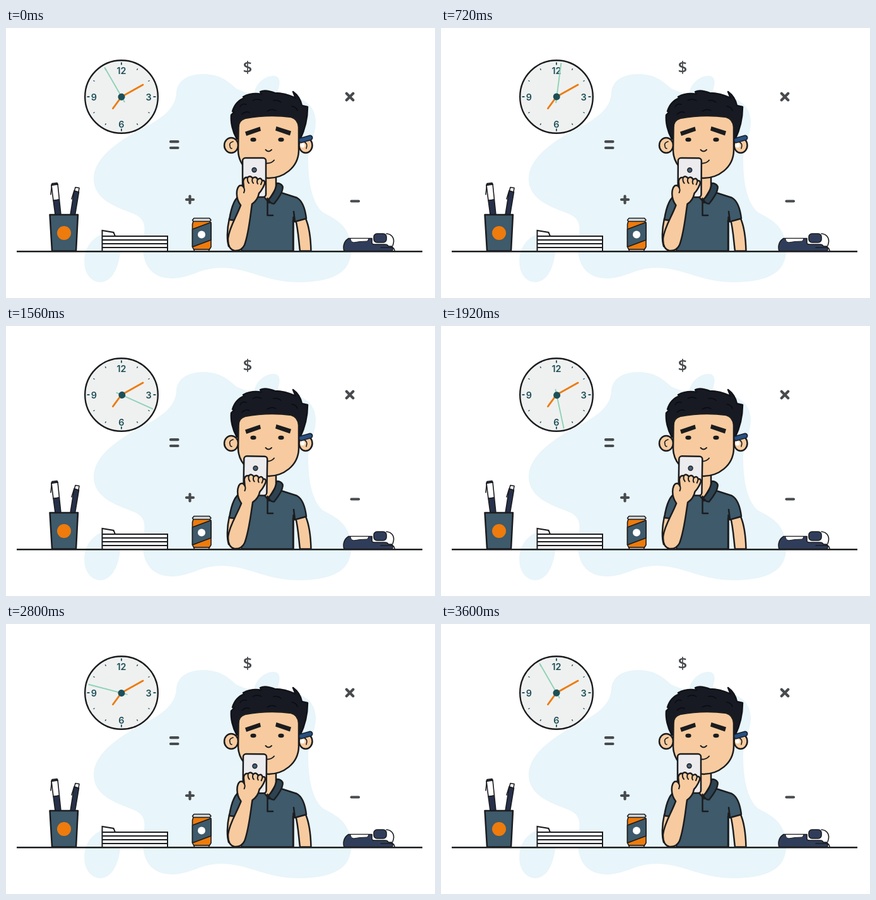
An HTML page for the animation above (3.64 s loop, 680 by 428 pixels).

```html
<!DOCTYPE html>
<html lang="en">
<head>
<meta charset="utf-8">
<title>Thinking at the desk</title>
<style>
  html, body { margin: 0; width: 100%; height: 100%; overflow: hidden; background: #fff; }
  svg { display: block; width: 680px; height: 428px; }
  .line { fill: none; stroke: #1b1c1f; stroke-width: 2.5; stroke-linecap: round; stroke-linejoin: round; }
  .skin { fill: #f7cb9f; }
  .shirt { fill: #3e5a6b; }
  .hair { fill: #171a23; stroke: #111319; }
  .collar { fill: #2d4352; }
  .navy { fill: #26304a; }
  .white { fill: #fff; }
  .thin { stroke-width: 1.6; }
  .nums { font: 600 14.5px Inter, Lato, sans-serif; fill: #1f4f58; text-anchor: middle; }
  .signs { fill: none; stroke: #484b4e; stroke-width: 4.2; stroke-linecap: round; }
  .dollar { font: 600 26px "Open Sans", "Noto Sans", sans-serif; fill: #484b4e; text-anchor: middle; }
</style>
</head>
<body>
<svg viewBox="0 0 680 428" xmlns="http://www.w3.org/2000/svg">
  <g id="backdrop" fill="#e8f5fa">
    <path d="M313 73C286 73 271 85 270 103C269 127 248 142 222 156C184 176 139 203 139 239C139 273 176 284 201 294C229 305 217 326 217 347C217 377 232 397 264 397C295 396 307 380 343 380C386 381 415 404 466 403C515 402 547 390 547 352C547 313 522 303 502 292C482 274 479 235 479 207C481 182 491 170 491 148C490 121 470 108 440 108C405 109 383 105 365 96C350 82 336 73 313 73Z"/>
    <path d="M393 105C395 86 414 74 427 76C437 79 434 94 428 105Z"/>
    <path d="M125 360C129 339 147 324 166 326C182 328 183 345 180 363C176 386 165 403 149 403C131 402 121 383 125 360Z"/>
  </g>

  <g id="clock">
    <circle cx="183" cy="109" r="57.8" fill="#eff1f0" stroke="#1b1c1f" stroke-width="2.4"/>
    <g id="ticks" stroke="#1f4f58"></g>
    <g class="nums">
      <text x="183" y="72.5">12</text>
      <text x="226" y="114.5">3</text>
      <text x="183" y="157.5">6</text>
      <text x="139.5" y="114.5">9</text>
    </g>
    <path d="M217 90L183 109L169.500 127.500" fill="none" stroke="#ee7b0c" stroke-width="2.9" stroke-linecap="round"/>
    <g id="second">
      <path d="M183.400 55V119" stroke="#8ed2b7" stroke-width="1.9"/>
      <circle cx="183.200" cy="109" r="5.5" fill="#1c4f58"/>
    </g>
  </g>

  <text class="dollar" x="383" y="70.5">$</text>
  <path class="signs" d="M539.800 103.800l10.400 10.400m0-10.400l-10.400 10.400M261 180.200h11.500m-11.500 9.800h11.500M286 272h11m-5.500-5.500v11M547.500 274.500h11.500"/>

  <g id="pens" class="line thin">
    <path class="white" d="M72 249L82 247.500L84.500 272L75 273.500Z"/>
    <path class="navy" d="M75 273.500L84.500 272L87 296H78ZM73 246.500L81 245.500L82 248L72 249.300Z"/>
    <path d="M72.500 249L71 264"/>
    <path class="navy" d="M108 258L115.500 260L109.500 296H102Z"/>
    <path class="white" d="M110 252.500L116 253.500L115 260L108.500 258Z"/>
    <path d="M108 258L104 271"/>
  </g>
  <path class="line shirt" d="M69.500 296H114L111 353.500H73Z"/>
  <circle cx="92" cy="325" r="11" fill="#ee7b0c"/>

  <g id="papers" class="line" style="stroke-width:2;stroke-linecap:butt;stroke-linejoin:miter">
    <path class="white" d="M152.500 354V321L170.500 324L173 330H256V354Z"/>
    <path d="M152.500 330H256M152.500 336H256M152.500 342H256M152.500 348H256"/>
  </g>

  <g id="can" class="line thin">
    <path fill="#ee7b0c" d="M297 306H323L325 311V347L322.500 351H297.500L295.500 347V311Z"/>
    <path class="shirt" d="M295.500 319L325 308V336L295.500 347Z"/>
    <path fill="#d5dade" d="M298 301.500H322.500L325 304.500L323 306.500H297L295.500 304.500ZM297.500 351H322.500L321 354H299Z"/>
    <circle cx="310" cy="327.500" r="6" fill="#fff" stroke="none"/>
  </g>

  <g id="gadget" class="line thin">
    <path fill="none" d="M603 326C613 327 617 335 613 345"/>
    <path fill="#303d5a" d="M536 353.500C533 345 537 337 543 333.500H580V340Q580 343 584 343H601Q605 343 606 346H612Q614 350 612 353.500Z"/>
    <path class="white" stroke-width="1" d="M546 333.500H575L573 338Q560 338 551 340Q546 339 546 333.500Z"/>
    <rect fill="#303d5a" x="583" y="326" width="20" height="14" rx="5"/>
    <path d="M594 348H609Q615 347 616 353"/>
  </g>

  <g id="man" class="line">
    <path class="skin" d="M459 304C463 318 464 338 466 353.500H483.500C483 334 481 316 475 302Z"/>
    <path class="skin" d="M354 302C350 320 350 337 353 346L374 344L370 302Z"/>
    <path class="skin" d="M408 228H428V254L416 274L406 268Z"/>
    <path class="shirt" d="M405 263L372 265C362 269 357 284 354 304L364 305V330L374 353.500H455V305L458 307L476 302C474 285 470 274 461 269L436 261L417 277Z"/>
    <path d="M456 291L458 307M455.500 300V353"/>
    <path class="collar" d="M429 246Q436 246 438.500 251Q440 260 425 278.500Q419 279 416 272Q427 261 429 246Z"/>
    <path d="M414.500 270V297H423"/>

    <g id="head">
      <ellipse class="skin" cx="357" cy="186" rx="11" ry="12"/>
      <ellipse class="skin" cx="475" cy="186" rx="10.5" ry="12"/>
      <path class="thin" d="M360 180Q353 182 355 187Q355 191 358 191M472 180Q479 183 476 191"/>
      <path class="hair" d="M366 176C359 164 356 149 357 138L362 133L359 132Q364 116 378 111L376 109Q390 102 405 105L403 101Q411 97 426 103Q442 103 459 111L455 101Q466 109 469 123L478 125Q478 152 466 177Z"/>
      <path class="skin" d="M368.500 158Q368 146 379 143Q416 136 452 141Q463 144 464 157V195C463 222 439 238 416 238C391 237 369 220 368 195Z"/>
      <path stroke="#090b10" stroke-width="1.4" d="M371 125Q374 119 381 121M391 115Q398 111 405 115M424 115Q430 113 436 118M453 124Q460 125 462 131M374 137Q380 131 386 134M414 132Q421 127 428 131"/>
      <path fill="#1b1c1f" stroke="none" d="M379 164.500L402.500 156.500L404 163L381 171ZM428.500 156L452 163.500L450 170.500L427 162.500Z"/>
      <g fill="#1b1c1f" stroke="none">
        <ellipse cx="392" cy="177" rx="4.6" ry="3.2"/>
        <ellipse cx="436" cy="177" rx="4.6" ry="3.2"/>
      </g>
      <path style="stroke-width:2" d="M411.500 193Q416 198 421 193M412 214.500Q421 215 425 209.500"/>
      <circle cx="470" cy="186" r="3.6" fill="#fff" stroke="none"/>
      <path stroke="#17202f" style="stroke-width:9" d="M468 178L482 174"/>
      <path style="stroke:#285080;stroke-width:5.5" d="M468 178L482 174"/>
    </g>

    <g id="arm">
      <rect x="375" y="206" width="37" height="62" rx="4.5" fill="#ececee"/>
      <circle cx="393.500" cy="225" r="3.5" fill="#496174" style="stroke-width:1.4"/>
      <path class="skin" d="M372 281C363 269 365 254 370 250Q375 248 377 253L376 243Q377 236 383 237Q387 233 391 238Q396 234 399 240Q404 236 406 242Q411 241 410 247Q406 257 401 262Q399 273 390 279C387 299 385 325 378 344Q373 354 362 353Q351 350 352 333C354 316 365 300 372 281Z"/>
      <path style="stroke-width:2" d="M383 238Q382 243 385 246M391 238Q389 243 392 246M399 240Q397 244 399 247M406 242Q405 246 404 248M377 253Q379 257 377 261"/>
    </g>
  </g>

  <path d="M17 354.300H660" stroke="#1b1c1f" stroke-width="2.5"/>
</svg>

<script>
  const $ = id => document.getElementById(id);
  const LOOP = 3640, SWEEP = 3600, STEP = 40;
  const ease = x => x * x * (3 - 2 * x);

  for (let i = 0; i < 12; i++) {
    const tick = document.createElementNS("http://www.w3.org/2000/svg", "path");
    tick.setAttribute("d", i % 3 ? "M183 57.500v2.500" : "M183 54.500v4");
    tick.setAttribute("stroke-width", i % 3 ? 1.4 : 1.9);
    tick.setAttribute("transform", `rotate(${i * 30} 183 109)`);
    $("ticks").append(tick);
  }

  function draw(ms) {
    const p = Math.min(ms / SWEEP, 1);
    const sway = ease(1 - Math.abs(2 * p - 1));
    $("second").setAttribute("transform", `rotate(${360 * ease(p) - 30} 183.4 109.4)`);
    $("arm").setAttribute("transform", `rotate(${sway} 365 345)`);
  }

  const start = performance.now();
  function tick(now) {
    const ms = Math.max(0, now - start) % LOOP;
    draw(Math.floor(ms / STEP) * STEP);
    requestAnimationFrame(tick);
  }
  draw(0);
  requestAnimationFrame(tick);
</script>
</body>
</html>
```
